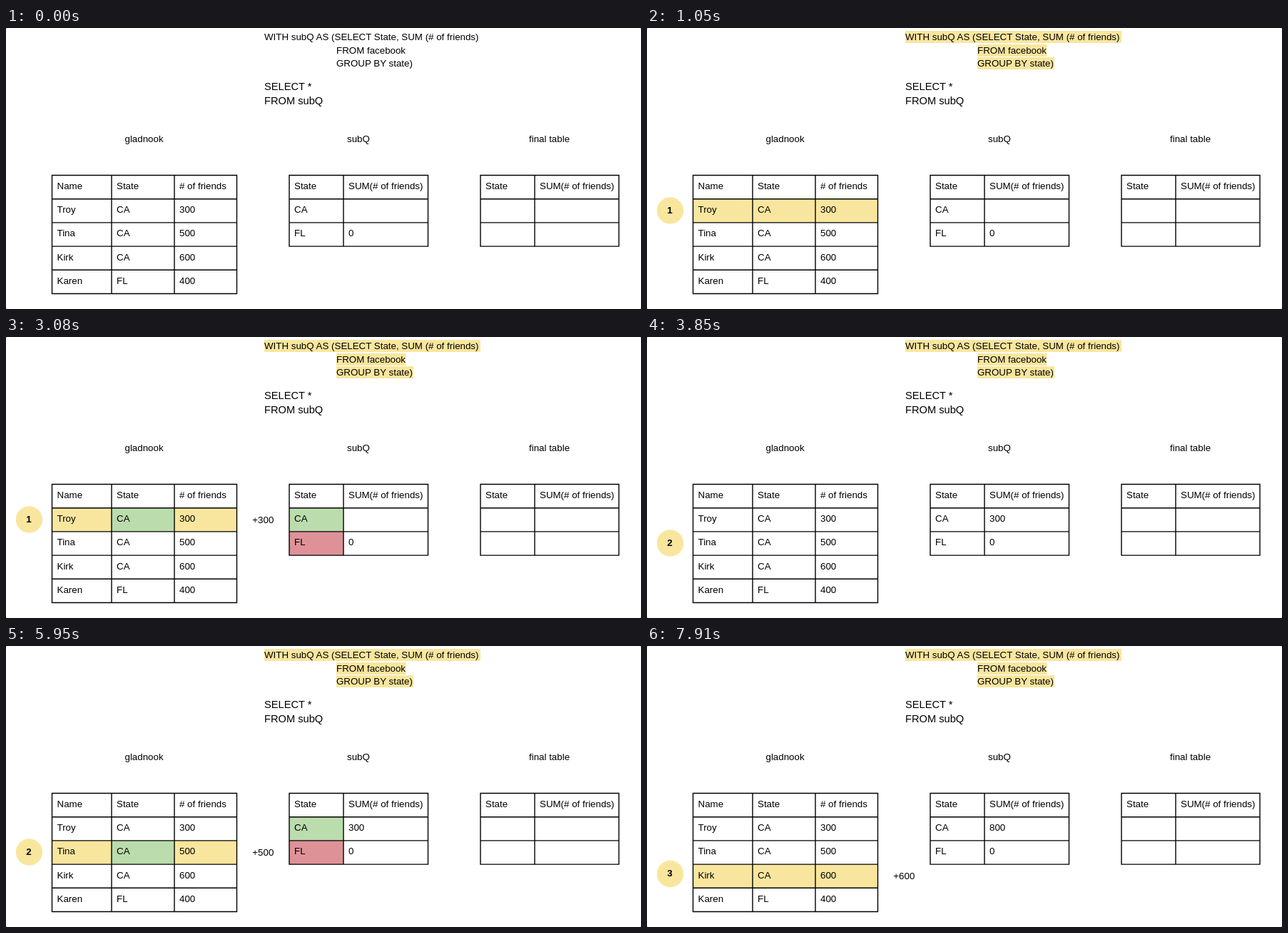
Animation of 890x394 px, one loop 8 s. Source, as an HTML page:

```html
<!DOCTYPE html>
<html lang="en">
<head>
<meta charset="utf-8">
<title>Subquery walkthrough</title>
<style>
  html, body { margin: 0; width: 100%; height: 100%; overflow: hidden; background: #c4c4c4; }
  svg { display: block; width: 890px; height: 394px; background: #fff; border-radius: 3px; }
  text { font: 13.33px "Liberation Sans", Arial, sans-serif; fill: #000; white-space: pre; }
  .big { font-size: 14.67px; }
  .bold { font-weight: bold; text-anchor: middle; }
  path { fill: none; stroke: #000; stroke-width: 1.4; stroke-linecap: square; }
</style>
</head>
<body>
<svg id="stage" viewBox="0 0 890 394">
  <g id="fills"></g>
  <g id="lines"></g>
  <g id="labels"></g>
</svg>
<script>
const LOOP = 8000, TOP = 206.5, ROW = 33.2;
const YELLOW = '#f9e69e', GREEN = '#bbdcac', RED = '#de9298';
const [fills, lines, labels] = ['fills', 'lines', 'labels'].map(id => document.getElementById(id));

function add(parent, tag, attrs, content = '') {
  const el = document.createElementNS('http://www.w3.org/2000/svg', tag);
  for (const key in attrs) el.setAttribute(key, attrs[key]);
  el.textContent = content;
  parent.append(el);
  return el;
}
const text = (x, y, content, cls = '') => add(labels, 'text', { x, y, class: cls }, content);
const box = (x, y, width, height, fill) => add(fills, 'rect', { x, y, width, height, fill });
const rowY = i => TOP + ROW * i;
const cell = (x1, x2, row, fill) => box(x1, rowY(row), x2 - x1, ROW, fill);

// Visible only between two times of the loop, with hard cuts.
function show(el, from, to = LOOP) {
  const frames = [{ opacity: 0, offset: 0 }, { opacity: 1, offset: from / LOOP }];
  frames.push({ opacity: to < LOOP ? 0 : 1, offset: to < LOOP ? to / LOOP : 1 });
  if (to < LOOP) frames.push({ opacity: 0, offset: 1 });
  frames.forEach(f => f.easing = 'step-end');
  el.animate(frames, { duration: LOOP, iterations: Infinity });
}

function table(xs, rows) {
  const left = xs[0], right = xs[xs.length - 1];
  let d = xs.map(x => `M${x} ${TOP}V${rowY(rows.length)}`).join('');
  for (let i = 0; i <= rows.length; i++) d += `M${left} ${rowY(i)}H${right}`;
  add(lines, 'path', { d });
  rows.forEach((row, i) => row.forEach((value, c) =>
    value && text(xs[c] + 7, Math.round(226 + ROW * i), value)));
}

// Query
[[362, 17, 'WITH subQ AS (SELECT State, SUM (# of friends)', 303],
 [463, 36, 'FROM facebook', 97.5],
 [463, 54, 'GROUP BY state)', 108]].forEach(([x, y, content, width]) => {
  text(x, y, content);
  show(box(x, y - 13, width, 17, YELLOW), 420);
});
text(362, 87, 'SELECT *', 'big');
text(362, 107, 'FROM subQ', 'big');

// Tables
text(166.5, 160, 'gladnook');
text(478, 160, 'subQ');
text(733, 160, 'final table');
table([64.5, 148, 236, 323.5], [
  ['Name', 'State', '# of friends'],
  ['Troy', 'CA', '300'],
  ['Tina', 'CA', '500'],
  ['Kirk', 'CA', '600'],
  ['Karen', 'FL', '400']
]);
table([397, 473, 591.5], [['State', 'SUM(# of friends)'], ['CA', ''], ['FL', '0']]);
table([665, 741, 859], [['State', 'SUM(# of friends)'], ['', ''], ['', '']]);

// One pass per source row: marker, row highlight, amount, state comparison, next pass
const passes = [
  { marker: 420, row: 980, amount: 1470, match: 2100, end: 3570, y: 256, plus: '+300', sum: '0' },
  { marker: 3570, row: 4340, amount: 4830, match: 5670, end: 6720, y: 289, plus: '+500', sum: '300' },
  { marker: 6720, row: 7420, amount: 7910, match: LOOP, end: LOOP, y: 319.5, plus: '+600', sum: '800' }
];
passes.forEach((p, i) => {
  const n = i + 1;
  show(add(fills, 'circle', { cx: 32.5, cy: p.y, r: 18.7, fill: YELLOW }), p.marker, p.end);
  show(text(32, Math.floor(p.y) + 4, n, 'bold'), p.marker, p.end);
  show(cell(64.5, 323.5, n, YELLOW), p.row, p.end);
  show(text(345.3, 228 + 33 * n, p.plus), p.amount, p.end);
  show(text(480, 259, p.sum), i ? p.marker : 0, p.end);
  if (p.match < LOOP) {
    show(cell(148, 236, n, GREEN), p.match, p.end);
    show(cell(397, 473, 1, GREEN), p.match, p.end);
    show(cell(397, 473, 2, RED), p.match, p.end);
  }
});
</script>
</body>
</html>
```
